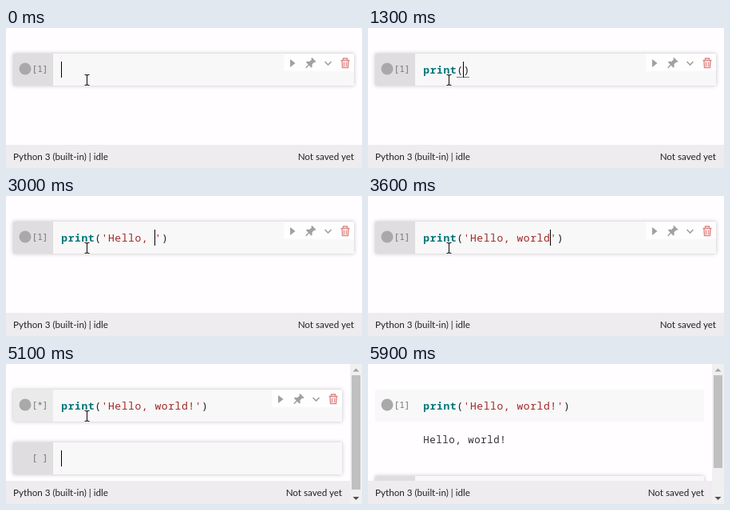
Write an HTML page that moves like this. It is 446 px wide and 175 px high and loops after 6.5 s.

```html
<!DOCTYPE html>
<html lang="en">
<head>
<meta charset="utf-8">
<title>Notebook cell</title>
<style>
html, body { margin: 0; width: 100%; height: 100%; overflow: hidden; background: #fffdff; }
svg { display: block; }
text { white-space: pre; }
.code { font: 13px "Noto Sans Mono", "DejaVu Sans Mono", monospace; letter-spacing: .57px; fill: #222; }
.out { font-size: 12.4px; fill: #333; }
.kw { font-weight: 700; fill: #007678; }
.str { fill: #a02828; }
.label { font: 11.2px "Noto Sans Mono", "DejaVu Sans Mono", monospace; fill: #757275; text-anchor: middle; }
.status { font: 11.65px Lato, "Open Sans", sans-serif; fill: #222; }
</style>
</head>
<body>
<svg width="446" height="175" viewBox="0 0 446 175">
  <defs>
    <filter id="shadow" x="-10%" y="-50%" width="120%" height="200%">
      <feDropShadow dx="0" dy="0" stdDeviation="2.6" flood-color="#000" flood-opacity=".24"/>
    </filter>
  </defs>
  <rect width="446" height="175" fill="#fffdff"/>

  <g id="cell1">
    <rect id="body1" x="9" y="32" height="40" fill="#f8f8f8"/>
    <rect id="gutter1" x="9" y="32" width="50" height="40" fill="#e0dde0"/>
  </g>
  <circle cx="24" cy="51" r="7.500" fill="#aaa8aa"/>
  <text id="count" class="label" x="42.5" y="55"></text>
  <text class="code" x="69.300" y="57"><tspan id="name"></tspan><tspan id="open"></tspan><tspan id="str" class="str"></tspan><tspan id="close"></tspan></text>
  <path id="match" d="M111 61.5h7.5M119.500 61.5h7.5" stroke="#777"/>
  <text id="output" class="code out" x="69.300" y="99">Hello, world!</text>

  <g id="cell2">
    <g filter="url(#shadow)">
      <rect x="9" width="412" height="40" fill="#f8f8f8"/>
      <rect x="9" width="50" height="40" fill="#e0dde0"/>
    </g>
    <text class="label" x="42.500" y="23">[ ]</text>
  </g>
  <rect id="caret" width="1" height="20" fill="#000"/>

  <g id="tools">
    <rect x="348" y="33" width="88" height="21" fill="#fff" opacity=".85"/>
    <path d="M356 39l6.500 5-6.500 5z" fill="#a0a0a0"/>
    <g transform="translate(381 44.500) rotate(45)" fill="#a0a0a0">
      <path d="M-3.500-7h7v1.800h-1.200v4l2.500 2.200v1.500h-4v5h-1.600v-5h-4v-1.500l2.500-2.200v-4h-1.200z"/>
    </g>
    <path d="M399.500 42l4 4 4-4" fill="none" stroke="#a0a0a0" stroke-width="1.600"/>
    <g fill="none" stroke="#df8686" stroke-width="1.400">
      <path d="M419.500 40.500h11M422.500 40v-2h5v2M421 41l.5 8.500h7l.5-8.500M423.500 42.500v5.500M426.500 42.500v5.500"/>
    </g>
  </g>

  <rect y="146" width="446" height="29" fill="#eeecee"/>
  <text class="status" x="9" y="165">Python 3 (built-in) | idle</text>
  <text id="saved" class="status" y="165" text-anchor="end">Not saved yet</text>

  <g id="scroll">
    <rect x="431" width="15" height="175" fill="#f1f0f1"/>
    <rect id="thumb" x="433" y="14" width="11" fill="#c1c0c1"/>
    <path d="M434.500 9.500l4-4 4 4z" fill="#a3a3a3"/>
    <path d="M434.500 166l4 4 4-4z" fill="#505050"/>
  </g>

  <g id="beam" fill="none">
    <path d="M-3-6h2l1 1 1-1h2M0-5v11M-3 7h2l1-1 1 1h2" stroke="#fff" stroke-width="2.500"/>
    <path d="M-3-6h2l1 1 1-1h2M0-5v11M-3 7h2l1-1 1 1h2" stroke="#111" stroke-width="1.100"/>
  </g>
  <path id="arrow" d="M0 0v13l3-2.800 2 4.800 2-1-2-4.500h4z" fill="#000" stroke="#fff" stroke-width=".8"/>
</svg>
<script>
const LOOP = 6500, RUN = 5100, DONE = 5200, LEAVE = 5600;
const LEFT = 69, ADVANCE = 8.37;
const $ = id => document.getElementById(id);

// [time, characters typed]; brackets and quotes close themselves
const TEXT = "print('Hello, world!";
const KEYS = [[400, 1], [600, 2], [700, 4], [800, 5], [1300, 6], [1700, 7], [1900, 8],
  [2200, 9], [2300, 10], [2400, 11], [2600, 12], [2800, 13], [3000, 14],
  [3200, 15], [3300, 17], [3600, 19], [4500, 20]];
// I-beam/arrow positions while the pointer leaves, one per 100 ms
const EXIT = [[84, 66], [50, 69], [8, 73]];

const show = (id, on) => $(id).setAttribute("visibility", on ? "visible" : "hidden");
const move = (id, x, y) => $(id).setAttribute("transform", `translate(${x} ${y})`);
const write = (id, s) => { if ($(id).textContent !== s) $(id).textContent = s; };

function drawCode(t) {
  const n = KEYS.reduce((len, [at, count]) => t >= at ? count : len, 0);
  write("name", TEXT.slice(0, Math.min(n, 5)));
  $("name").setAttribute("class", n >= 5 ? "kw" : "");
  write("open", n > 5 ? "(" : "");
  write("str", n > 6 ? TEXT.slice(6, n) + "'" : "");
  write("close", n > 5 ? ")" : "");
  show("match", n === 6);
  return n;
}

function drawPointer(t) {
  const step = Math.floor((t - LEAVE) / 100);
  const pos = step < 0 ? [101.5, 64.5] : EXIT[step];
  const inText = pos && pos[0] > 59;
  show("beam", inText);
  show("arrow", pos && !inText);
  if (pos) move(inText ? "beam" : "arrow", ...pos);
}

function draw(t) {
  const ran = t >= RUN, done = t >= DONE;
  const right = ran ? 421 : 436;
  const typed = drawCode(t);

  $("body1").setAttribute("width", right - 9);
  $("gutter1").setAttribute("opacity", done ? 0 : ran ? 0.5 : 1);
  $("cell1").setAttribute("filter", done ? "none" : "url(#shadow)");
  write("count", ran && !done ? "[*]" : "[1]");
  show("output", done);

  show("cell2", ran);
  move("cell2", 0, done ? 140 : 98);
  $("caret").setAttribute("x", ran ? LEFT : Math.floor(LEFT + typed * ADVANCE));
  $("caret").setAttribute("y", ran ? 108 : 42);
  show("caret", !done);

  move("tools", right - 436, 0);
  show("tools", t < LEAVE + 200);
  $("saved").setAttribute("x", right);
  show("scroll", ran);
  $("thumb").setAttribute("height", done ? 116 : 143);
  drawPointer(t);
}

const start = performance.now();
function tick() {
  draw((performance.now() - start) % LOOP);
  requestAnimationFrame(tick);
}
tick();
</script>
</body>
</html>
```
